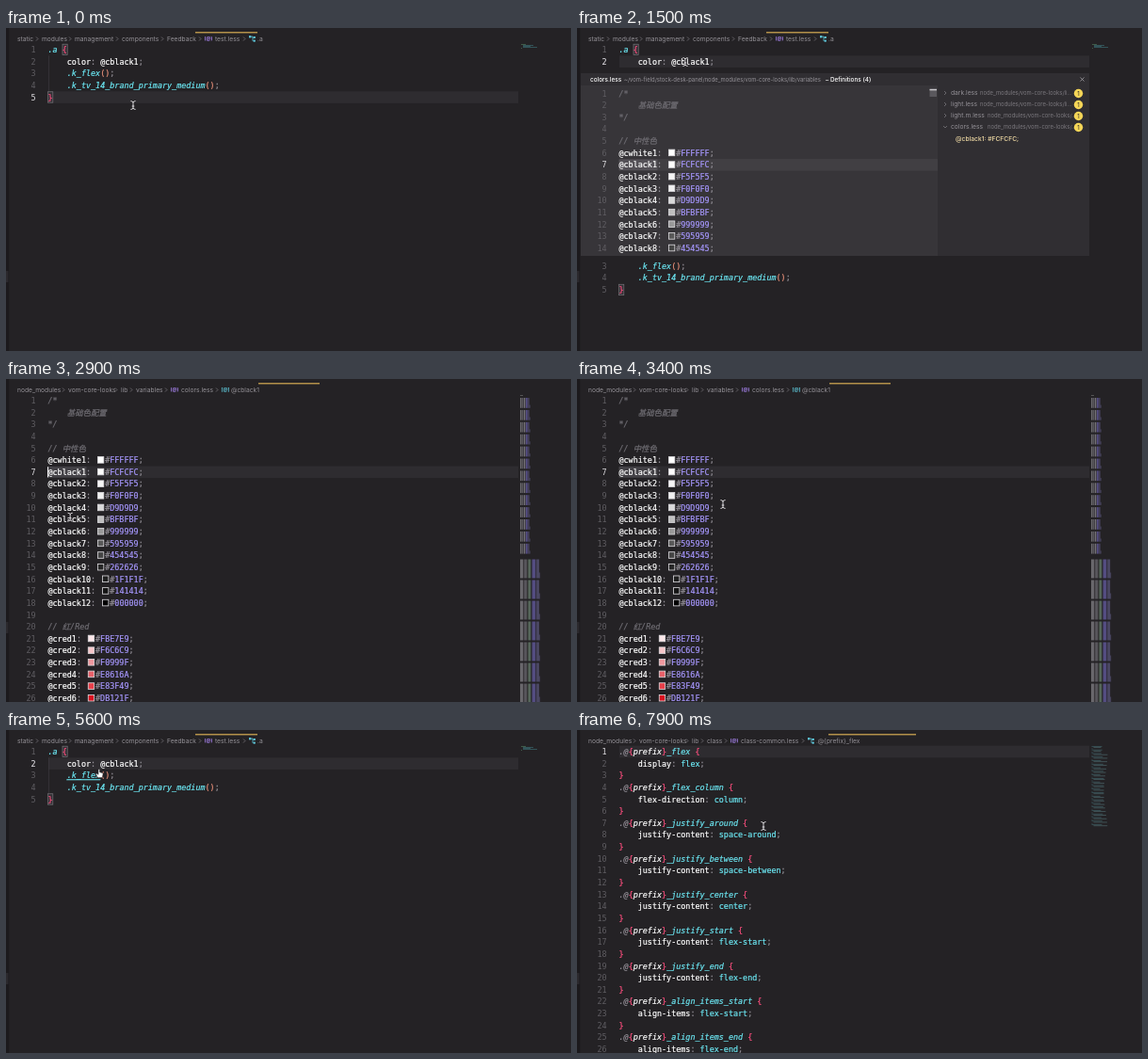
An HTML page for the animation above (8000 ms loop, 600x343 px).

```html
<!DOCTYPE html>
<html lang="en">
<head>
<meta charset="utf-8">
<title>Go to definition</title>
<style>
html, body { margin: 0; width: 100%; height: 100%; overflow: hidden; background: #242225; }
svg { display: block; width: 100vw; height: 100vh; }
text { white-space: pre; fill: currentColor; }
.code { font: 8.42px "DejaVu Sans Mono", "Noto Sans CJK SC", "Noto Sans CJK", monospace; stroke: currentColor; stroke-width: .2px; }
.ui { font: 6.7px Inter, Roboto, sans-serif; color: #949197; }
.ui.small { font-size: 6.4px; }
.ui.path { font-size: 5.9px; }
.ui.strong { font-weight: 500; }
.white, .ui.white { color: #fff; }
.gray { color: #938f97; }
.pink { color: #ff4f7f; }
.orange { color: #e9917a; }
.cyan { color: #6ce8f4; }
.purple { color: #a596fb; }
.comment { color: #706e74; font-style: italic; }
.italic { font-style: italic; }
.code.num { color: #5f5d62; text-anchor: end; stroke: none; }
.code.num.on { color: #dddbdf; }
.link { color: #6ce8f4; text-decoration: underline; }
</style>
</head>
<body>
<svg id="stage" viewBox="0 0 600 343" preserveAspectRatio="none"></svg>
<script>
const LOOP = 8000, ROW = 12.64, CHAR = 5.07, LEFT = 44.5, BG = '#242225';
const $ = id => document.getElementById(id);
const rowY = (n, top = 23) => top + (n - 1) * ROW;
const rect = (x, y, w, h, fill, extra = '') =>
  `<rect x="${x}" y="${y}" width="${w}" height="${h}" fill="${fill}" ${extra}/>`;
const stroke = (d, color, w = 0.8) => `<path d="${d}" fill="none" stroke="${color}" stroke-width="${w}"/>`;
const label = (x, y, text, cls = '', extra = '') => `<text class="ui ${cls}" x="${x}" y="${y}" ${extra}>${text}</text>`;
const span = (cls, text, id = '') => `<tspan class="${cls}" ${id && `id="${id}"`}>${text}</tspan>`;
const group = (id, body) => `<g id="${id}">${body}</g>`;

// Code lines
const codeAt = (x, y, body) => `<text class="code" x="${x}" y="${y + 3}">${body}</text>`;
const number = (n, y, on) => `<text class="code num ${on ? 'on' : ''}" x="31.5" y="${y + 3}">${n}</text>`;
const line = (n, body, on, top) => number(n, rowY(n, top), on) + codeAt(LEFT, rowY(n, top), body);
const highlight = (y, right = 544, color = '#2e2c30') => rect(45, y - 6.3, right - 45, 12.6, color);
const decl = (name, value, id) =>
  '    ' + span('white', name) + span('gray', ': ') + span(value[0] === '@' ? 'white' : 'cyan', value, id) + span('gray', ';');
const mixin = (name, id) =>
  '    ' + span('cyan italic', '.' + name, id) + span('orange', '()') + span('gray', ';');
const guide = (from, to) => rect(45, rowY(from) - 6.3, 0.6, (to - from + 1) * ROW, '#403d43');
const bracketBox = (x, y) => rect(x, y - 5.8, 5.2, 11.4, '#343136', 'stroke="#77747a" stroke-width=".7"');

// Breadcrumbs
const chevron = (x, y, down) =>
  stroke(down ? `M${x - 2} ${y - 1}l2 2 2-2` : `M${x - 1} ${y - 2}l2 2-2 2`, '#838086', 0.7);
const glyph = (x, text, color) => label(x, 13.3, text, '', `style="color:${color};font-size:5px;font-weight:700"`);
const icons = {
  file: x => glyph(x - 0.4, '(@)', '#a884f0'),
  rule: x => stroke(`M${x + 1} 9.2h3v4.6h2M${x + 4} 10h2`, '#5fc9dc') +
    rect(x, 8.2, 2.2, 2.2, '#5fc9dc') + rect(x + 5, 9, 1.8, 2, '#5fc9dc') + rect(x + 5, 12.6, 1.8, 2, '#5fc9dc'),
  variable: x => glyph(x - 0.4, '[@]', '#5fc9dc')
};
const trail = parts => parts.map(([x, text, icon, textX = x], i) =>
  (i ? chevron(x - 5, 11.5) : '') + (icon ? icons[icon](x) : '') + label(textX, 14, text)).join('');
const tabLine = (x, w) => rect(x, 4, w, 1.5, '#b3914a');

// Stylesheet that uses the definitions
const testFile = () => {
  const tail = bracketBox(44.6, rowY(5)) + line(3, mixin('k_flex', 'flexLink')) +
    line(4, mixin('k_tv_14_brand_primary_medium')) +
    codeAt(LEFT, rowY(5), span('pink', '}')) + group('num5', number(5, rowY(5))) + group('num5on', number(5, rowY(5), true));
  const minimap = [[547, 5], [549, 11], [549, 8], [549, 15], [547, 1]]
    .map(([x, w], i) => rect(x, 17 + i * 1.05, w, 0.7, i % 4 ? '#3a6a70' : '#4d7358')).join('');
  return tabLine(201, 66) + trail([[12, 'static'], [38, 'modules'], [73, 'management'], [123, 'components'],
    [171, 'Feedback'], [211, 'test.less', 'file', 222], [258, '.a', 'rule', 267]]) + minimap +
    group('row5', highlight(rowY(5))) + group('row2', highlight(rowY(2))) + group('guide', guide(2, 4)) +
    bracketBox(60, rowY(1)) + line(1, span('cyan italic', '.a') + ' ' + span('pink', '{')) +
    line(2, decl('color', '@cblack1', 'colorLink')) + group('num2on', number(2, rowY(2), true)) +
    group('tail', tail) + group('peek', peek());
};

// Palette file
const names = (prefix, values) => values.split(' ').map((v, i) => [prefix + (i + 1), v]);
const blacks = names('@cblack', 'FCFCFC F5F5F5 F0F0F0 D9D9D9 BFBFBF 999999 595959 454545 262626 1F1F1F 141414 000000');
const reds = names('@cred', 'FBE7E9 F6C6C9 F0999F E8616A E83F49 DB121F');
const palette = ['/*', '    基础色配置', '*/', '', '// 中性色', ['@cwhite1', 'FFFFFF'], ...blacks, '', '// 红/Red', ...reds];
function paletteLine(item, n, top, id) {
  const y = rowY(n, top), on = n === 7;
  if (typeof item === 'string') return line(n, span('comment', item), on, top);
  const [name, hex] = item, x = LEFT + (name.length + 2) * CHAR;
  return line(n, span('white', name, on ? id : '') + span('gray', ':'), on, top) +
    rect(x + 2.2, y - 3.6, 6.4, 6.6, '#' + hex, 'stroke="#dedce0" stroke-width=".8"') +
    codeAt(x + 10, y, span('gray', '#') + span('purple', hex) + span('gray', ';'));
}
const paletteLines = (count, top, id) => palette.slice(0, count).map((p, i) => paletteLine(p, i + 1, top, id)).join('');

function paletteMap() {
  const block = (y, h, wide) => {
    const k = wide ? 2.1 : 1;
    return [[0, 1.6, '#69676c'], [2, 1.5, '#58565c'], [4, 1.4, wide ? '#56665a' : '#747178'], [6, 1.8, '#544d82'], [8.2, 1.4, '#4b4864']]
      .map(([x, w, c], i) => rect(546 + x * k, y, w * k, h, c) +
        (i === 4 ? rect(546 + (x + w) * k, y + h * 0.7, 1, h * 0.3, c) : '')).join('');
  };
  let out = rect(546, 17, 3, 1, '#555');
  for (let i = 0; i < 13; i++) out += block(20 + i * 12.9, 10.8, false);
  for (let i = 0; i < 7; i++) out += block(191.5 + i * 22, 20, true);
  return out;
}
const colorsFile = () => tabLine(268, 65) +
  trail([[12, 'node_modules'], [66, 'vom-core-looks'], [122, 'lib'], [138, 'variables'],
    [175, 'colors.less', 'file', 186], [229, '@cblack1', 'variable', 239]]) +
  highlight(rowY(7)) + rect(44.5, rowY(7) - 5.8, 41, 11.6, '#444247') + paletteLines(26) + paletteMap();

// Inline definitions panel
function peek() {
  const row = (y, name, pathX, tail, open) => chevron(391, y, open) + label(397, y + 2.4, name) +
    label(pathX, y + 2.4, 'node_modules/vom-core-looks' + tail, 'path', 'opacity=".75"') +
    `<circle cx="532.5" cy="${y + 0.5}" r="4.7" fill="#f5d657"/>` +
    label(532.5, y + 2.6, '1', '', 'text-anchor="middle" style="color:#252327;font-size:6px"');
  return rect(4, 48, 540, 194, '#373539') + rect(4, 48, 540, 13, '#302e32') +
    label(14, 57, 'colors.less', 'white small strong') +
    label(50, 57, '~/vom-field/stock-desk-panel/node_modules/vom-core-looks/lib/variables', 'path') +
    label(264, 57, '– Definitions (4)', 'white small strong') + stroke('M534.5 52.5l4 4m0-4l-4 4', '#b5b2b8', 0.7) +
    '<svg x="0" y="61" width="383" height="181" viewBox="0 61 383 181" style="width:383px;height:181px">' +
    highlight(rowY(7, 69.5), 383, '#413f43') +
    group('peekWord', rect(44.5, rowY(7, 69.5) - 5.8, 41, 11.6, '#545157')) +
    paletteLines(15, 69.5, 'peekLink') + '</svg>' +
    rect(374.5, 64, 7.5, 9, '#5a585d') + rect(374.5, 65, 7.5, 1.3, '#c9c7cb') +
    rect(383, 61, 161, 181, '#302e32') +
    row(69, 'dark.less', 428, '/li…') + row(81, 'light.less', 428, '/li…') +
    row(93, 'light.m.less', 436, '/…') + row(105, 'colors.less', 436, '/…', true) +
    label(402, 119.6, '@cblack1: #FCFCFC;', 'strong', 'style="color:#f3dda6"');
}

// Shared layout classes
const layout = [['flex', 'display', 'flex'], ['flex_column', 'flex-direction', 'column'],
  ...['around', 'between', 'center', 'start', 'end'].map((v, i) =>
    ['justify_' + v, 'justify-content', (i < 2 ? 'space-' : i > 2 ? 'flex-' : '') + v]),
  ...['start', 'end'].map(v => ['align_items_' + v, 'align-items', 'flex-' + v])];
function commonFile() {
  const body = layout.map(([name, prop, value], i) => {
    const n = i * 3 + 1;
    const head = span('gray italic', '.@') + span('pink', '{') + span('white italic', 'prefix') + span('pink', '}') +
      span('cyan italic', '_' + name) + ' ' + span('pink', '{');
    return line(n, head, n === 1) + line(n + 1, decl(prop, value)) + line(n + 2, span('pink', '}'));
  }).join('');
  let map = '';
  for (let i = 0; i < 68; i++) {
    const w = [11 + 2 * Math.sin(i), i < 6 ? 8 : 13 + 2 * Math.sin(i * 2), 1][i % 3];
    map += rect(i % 3 === 1 ? 548.5 : 546.5, 17 + i * 1.26, w, 0.7, i % 3 === 1 ? '#4a6468' : '#3d5d63');
  }
  return tabLine(267, 93) + trail([[12, 'node_modules'], [66, 'vom-core-looks'], [122, 'lib'], [138, 'class'],
    [163, 'class-common.less', 'file', 174], [245, '.@{prefix}_flex', 'rule', 254]]) + highlight(rowY(1)) + body + map;
}

const outlined = d => stroke(d, '#19171a', 2) + stroke(d, '#f4f2f5', 0.9);
$('stage').innerHTML = rect(0, 0, 600, 343, BG) + rect(0, 0, 3.2, 343, '#1b191c') + rect(0, 258, 2.5, 12, '#2b292d') +
  group('test', testFile()) + group('colors', colorsFile()) + group('common', commonFile()) +
  group('caret', rect(-0.5, -5.6, 1, 11.2, '#f8f6f9')) +
  group('mouse', group('beam', outlined('M-2.6-4.4Q0-4.4 0-2.8V2.8Q0 4.4-2.6 4.4M2.6-4.4Q0-4.4 0-2.8M0 2.8Q0 4.4 2.6 4.4M-1.3 1h2.6')) +
    group('hand', '<path d="M-1.4-4.6q1-.9 1.7 0v3l2.6.6q1 .4.8 1.5L2.8 4.2H-1.8L-3.8.8q-.2-1.2 1-.9l1.4 1z" fill="#fff" stroke="#19171a" stroke-width=".6"/>'));

// Pointer stops: time, x, y
const stops = [[0, 135, 82], [900, 115, 36], [1500, 115, 36], [2600, 66, 147], [2850, 66, 147], [3400, 155, 133],
  [3700, 155, 133], [4500, 221, 133], [5000, 221, 133], [5300, 118, 36], [5400, 118, 36], [5700, 93, 50],
  [6350, 93, 50], [7700, 198, 102], [LOOP, 198, 102]];
function pointer(t) {
  const i = stops.findIndex(s => s[0] > t), [t0, x0, y0] = stops[i - 1], [t1, x1, y1] = stops[i];
  const u = (t - t0) / (t1 - t0), e = u * u * (3 - 2 * u);
  return [x0 + (x1 - x0) * e, y0 + (y1 - y0) * e];
}
const show = (id, on) => $(id).setAttribute('display', on ? 'inline' : 'none');
const move = (id, x, y) => $(id).setAttribute('transform', `translate(${x} ${y})`);
// Caret places: start time, x, y
const carets = [[-600, 49.6, rowY(5)], [1000, 115.4, rowY(2)], [2900, LEFT, rowY(7)], [4800, 115.4, rowY(2)], [6050, 45, rowY(1)]];

function render(t) {
  const inColors = t >= 2900 && t < 4800, inCommon = t >= 6050, inTest = !inColors && !inCommon;
  const peeking = t >= 1350 && t < 2900, clicked = t >= 1000;
  show('test', inTest); show('colors', inColors); show('common', inCommon);
  show('peek', peeking); show('guide', !peeking);
  move('tail', 0, peeking ? 204.5 : 0);
  for (const id of ['row2', 'num2on']) show(id, clicked);
  for (const id of ['row5', 'num5on']) show(id, !clicked);
  show('num5', clicked);

  const colorLink = t >= 750 && t < 1500, peekLink = t >= 2500 && t < 2900, flexLink = t >= 5550 && t < 6050;
  $('colorLink').setAttribute('class', colorLink ? 'link' : 'white');
  $('peekLink').setAttribute('class', peekLink ? 'link' : 'white');
  $('flexLink').setAttribute('class', flexLink ? 'link italic' : 'cyan italic');
  show('peekWord', !peekLink);

  const [start, cx, cy] = carets.filter(c => c[0] <= t).pop();
  show('caret', !peeking && (t - start) % 1000 < 500);
  move('caret', cx, cy);
  const overLink = colorLink || peekLink || flexLink;
  show('hand', overLink); show('beam', !overLink);
  move('mouse', ...pointer(t));
}
const begin = performance.now();
function tick() {
  render((performance.now() - begin) % LOOP);
  requestAnimationFrame(tick);
}
tick();
</script>
</body>
</html>
```
